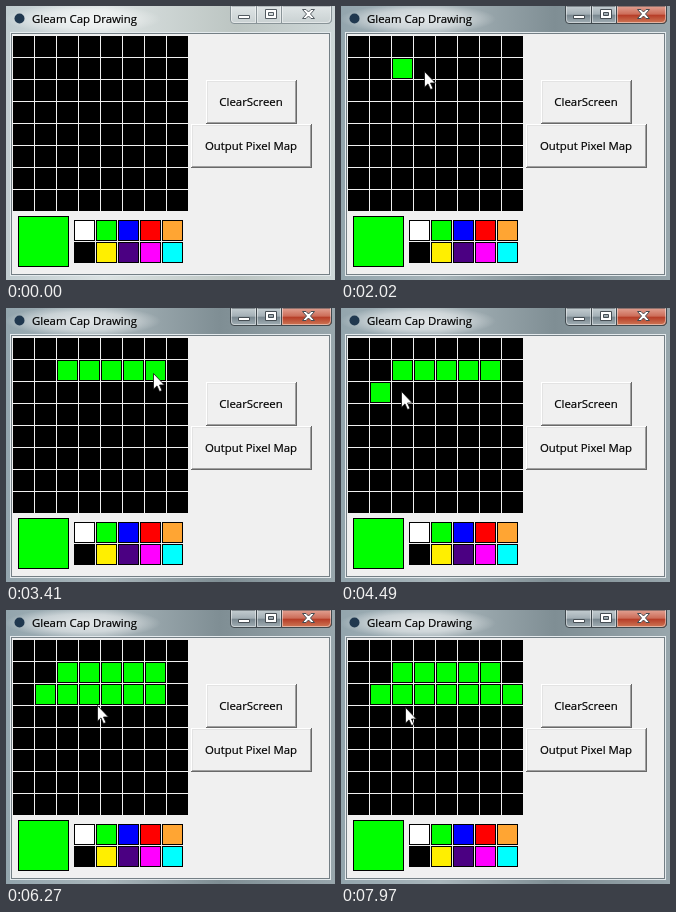
An HTML page for the animation above (8 s loop, 329x274 px).

```html
<!DOCTYPE html>
<html lang="en">
<head>
<meta charset="utf-8">
<title>Pixel drawing</title>
<style>
  html, body { margin: 0; width: 100%; height: 100%; overflow: hidden; }
  svg { display: block; width: 329px; height: 274px; }
  text { font: 11.4px "Open Sans", "Noto Sans", sans-serif; fill: #000; stroke: #000; stroke-width: .2px; }
</style>
</head>
<body>
<svg id="stage" viewBox="0 0 329 274">
  <defs>
    <linearGradient id="paleGlass">
      <stop offset="0" stop-color="#c0ccd0"/>
      <stop offset=".3" stop-color="#dbe2e2"/>
      <stop offset=".7" stop-color="#bcc5c2"/>
      <stop offset="1" stop-color="#ced7d8"/>
    </linearGradient>
    <linearGradient id="darkGlass">
      <stop offset="0" stop-color="#93a5ad"/>
      <stop offset=".3" stop-color="#a9b6bb"/>
      <stop offset=".65" stop-color="#7f8e94"/>
      <stop offset="1" stop-color="#98a6ac"/>
    </linearGradient>
    <linearGradient id="paleCap" x2="0" y2="1">
      <stop offset="0" stop-color="#dfe5e6"/>
      <stop offset="1" stop-color="#c8d0d1"/>
    </linearGradient>
    <linearGradient id="darkCap" x2="0" y2="1">
      <stop offset="0" stop-color="#c4cdd1"/>
      <stop offset=".48" stop-color="#a3afb5"/>
      <stop offset=".5" stop-color="#77858d"/>
      <stop offset="1" stop-color="#a3b0b6"/>
    </linearGradient>
    <linearGradient id="redCap" x2="0" y2="1">
      <stop offset="0" stop-color="#e2a293"/>
      <stop offset=".48" stop-color="#cc6b57"/>
      <stop offset=".5" stop-color="#b53a25"/>
      <stop offset="1" stop-color="#d07a58"/>
    </linearGradient>
    <radialGradient id="glow">
      <stop offset="0" stop-color="#fff" stop-opacity=".7"/>
      <stop offset=".6" stop-color="#fff" stop-opacity=".45"/>
      <stop offset="1" stop-color="#fff" stop-opacity="0"/>
    </radialGradient>
  </defs>
  <g id="inactive"></g>
  <g id="active"></g>
  <ellipse cx="77" cy="13" rx="78" ry="15" fill="url(#glow)"/>
  <circle cx="13.5" cy="12.5" r="5" fill="#20384f"/>
  <text x="26" y="17">Gleam Cap Drawing</text>
  <g id="client" shape-rendering="crispEdges"></g>
  <text x="245" y="100" text-anchor="middle">ClearScreen</text>
  <text x="245" y="144" text-anchor="middle">Output Pixel Map</text>
  <path id="cursor" d="M-.5-.5V15.2L3 11.9L5.5 17.6L8 16.5L5.5 11H10.4Z" fill="#fff" stroke="#111" stroke-width=".8"/>
</svg>
<script>
const LOOP = 8000, STEP = 77.5, ACTIVATE = 700, PITCH = 22, FACE = "#f0f0f0";
const byId = id => document.getElementById(id);

function add(parent, name, attrs) {
  const node = document.createElementNS("http://www.w3.org/2000/svg", name);
  for (const key in attrs) node.setAttribute(key, attrs[key]);
  parent.append(node);
  return node;
}
const box = (parent, x, y, width, height, fill, stroke = "none") =>
  add(parent, "rect", { x, y, width, height, fill, stroke });
const shape = (parent, d, fill, stroke, extra) =>
  add(parent, "path", { d, fill, stroke, ...extra });

function drawFrame(parent, glass, cap, close, edge, ink) {
  box(parent, 0, 0, 329, 274, `url(#${glass})`);
  shape(parent, "M224.5 0V14Q224.5 17.5 228 17.5H321Q325.5 17.5 325.5 13V0Z", `url(#${cap})`, edge);
  shape(parent, "M275.5 0V17.5H321Q325.5 17.5 325.5 13V0Z", `url(#${close})`, edge);
  shape(parent, "M250.5 0V17", "none", edge);
  shape(parent, "M225.5 0V14Q226 16.5 228 16.5H249.5V0M251.5 0V16.5H274.5V0M276.5 0V16.5H321Q324 16.5 324.5 13V0",
    "none", "#fff", { opacity: .45 });
  shape(parent, "M232.5 9.5H243.5V12.5H232.5Z", "#fff", ink);
  shape(parent, "M259.5 3.5H270.5V12.5H259.5ZM262.5 6.5H267.5V9.5H262.5Z", "#fff", ink, { "fill-rule": "evenodd" });
  shape(parent, "M296.5 3.5H300L302.5 6L305 3.5H308.5L304.5 8L308.5 12.5H305L302.5 10L300 12.5H296.5L300.5 8Z", "#fff", ink);
}

function drawButton(parent, x, y, w, h) {
  box(parent, x, y, w, h, "#696969");
  box(parent, x, y, w - 1, h - 1, "#fff");
  box(parent, x + 1, y + 1, w - 2, h - 2, "#a0a0a0");
  box(parent, x + 1, y + 1, w - 3, h - 3, "#e3e3e3");
  box(parent, x + 2, y + 2, w - 4, h - 4, FACE);
}

drawFrame(byId("inactive"), "paleGlass", "paleCap", "paleCap", "#899498", "#535b61");
drawFrame(byId("active"), "darkGlass", "darkCap", "redCap", "#40494e", "#454d53");

const client = byId("client");
box(client, 4, 26, 321, 244, "#e4eaed");
box(client, 5, 27, 319, 242, "#747f85");
box(client, 6, 28, 317, 240, FACE);
box(client, 7, 30, 175, 175, "#000");
for (let i = 0; i < 7; i++) {
  box(client, 28 + i * PITCH, 30, 1, 175, FACE);
  box(client, 7, 51 + i * PITCH, 175, 1, FACE);
}
box(client, 12.5, 210.5, 50, 50, "#0f0", "#000");
["#fff", "#0f0", "#00f", "#f00", "#ffa533", "#000", "#ffef00", "#4b0082", "#f0f", "#0ff"]
  .forEach((color, i) => box(client, 68.5 + i % 5 * PITCH, 214.5 + Math.floor(i / 5) * PITCH, 20, 20, color, "#000"));
drawButton(client, 200, 74, 91, 44);
drawButton(client, 185, 118, 121, 44);

// Each run paints neighbouring cells of a row at a steady pace.
const runs = [
  { row: 1, from: 2, count: 5, start: 1640, pace: 405 },
  { row: 2, from: 1, count: 6, start: 4200, pace: 355 },
  { row: 2, from: 7, count: 1, start: 7200, pace: 0 }
];
const cells = runs.flatMap(({ row, from, count, start, pace }) =>
  Array.from({ length: count }, (_, i) => ({
    time: start + i * pace,
    node: box(client, 8 + (from + i) * PITCH, 31 + row * PITCH, 19, 19, "#0f0")
  })));

// Cursor tip: time, x, y
const path = [
  [90, 179, 264], [550, 94, 221], [700, 93, 221], [1020, 68, 110], [1480, 57, 67], [2020, 84, 66],
  [2720, 131, 65], [3410, 148, 66], [3880, 36, 83], [4200, 42, 84], [5570, 129, 85],
  [5960, 153, 87], [6420, 65, 100], [6890, 173, 83], [7200, 172, 83], [7970, 65, 98]
];

function cursorAt(t) {
  const next = path.findIndex(p => p[0] > t);
  if (next < 0) return path.at(-1).slice(1);
  const [t0, x0, y0] = path[Math.max(next - 1, 0)], [t1, x1, y1] = path[next];
  const k = t1 > t0 ? (t - t0) / (t1 - t0) : 0;
  return [Math.round(x0 + (x1 - x0) * k), Math.round(y0 + (y1 - y0) * k)];
}

function show(node, visible) {
  node.setAttribute("visibility", visible ? "visible" : "hidden");
}

function render(t) {
  show(byId("active"), t >= ACTIVATE);
  show(byId("inactive"), t < ACTIVATE);
  for (const cell of cells) show(cell.node, t >= cell.time);

  const entered = t >= path[0][0];
  const stepped = Math.max(path[0][0], Math.round(t / STEP) * STEP);
  show(byId("cursor"), entered);
  byId("cursor").setAttribute("transform", `translate(${cursorAt(stepped)})`);
}

function tick() {
  render(performance.now() % LOOP);
  requestAnimationFrame(tick);
}
tick();
</script>
</body>
</html>
```
